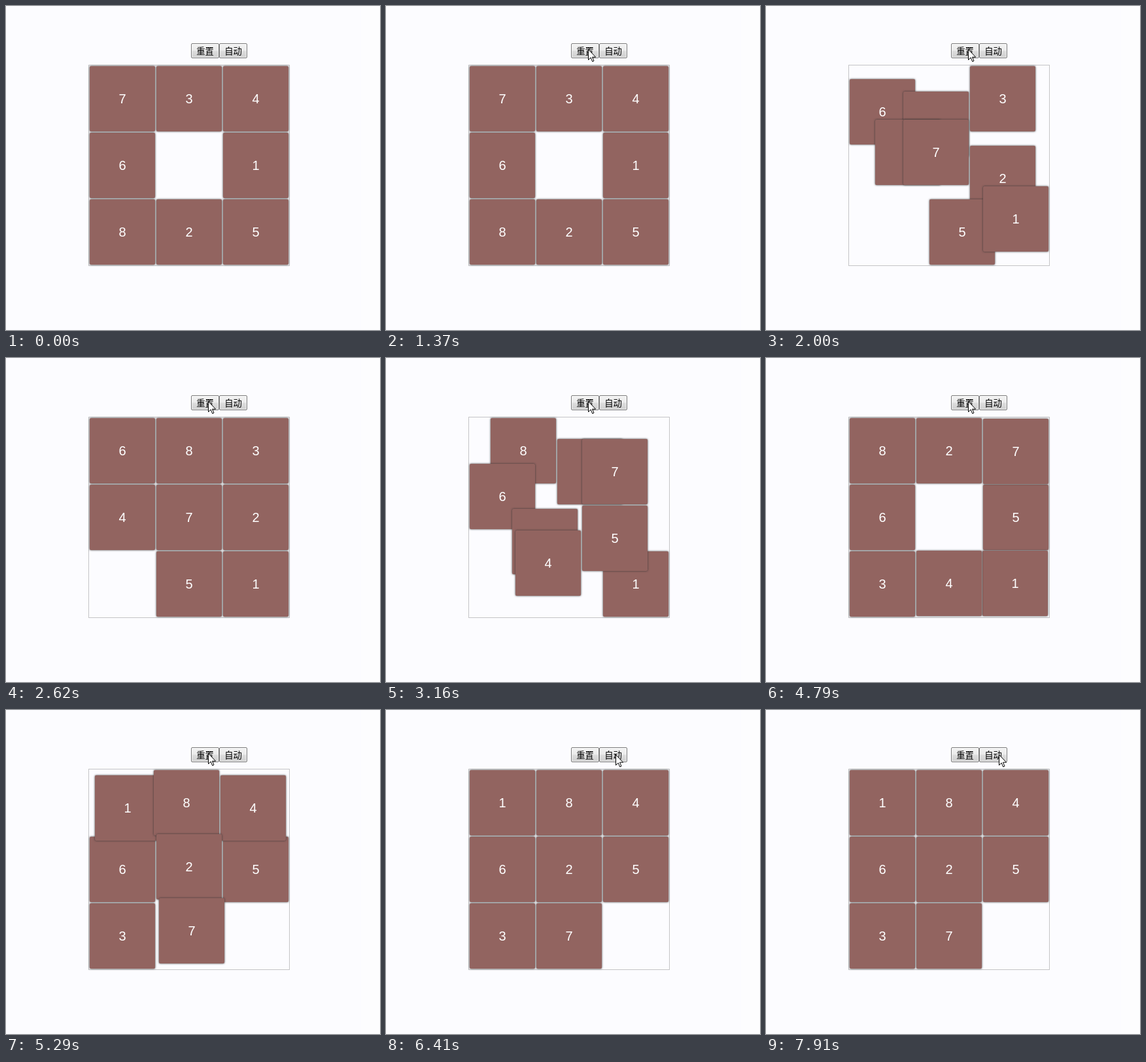
An HTML page for the animation above (8000 ms loop, 572 by 496 pixels).

```html
<!DOCTYPE html>
<html lang="zh">
<head>
<meta charset="utf-8">
<title>Sliding puzzle</title>
<style>
html, body { margin: 0; width: 100%; height: 100%; overflow: hidden; background: #fcfcff; }
#stage { position: relative; width: 572px; height: 496px; overflow: hidden; }
#strip { position: absolute; left: 543px; top: 0; width: 29px; height: 496px; background: #fdfdfe; }
.btn {
  position: absolute; top: 57px; width: 43px; height: 23px; box-sizing: border-box;
  border: 1px solid #7c7c7c; border-radius: 2px;
  background: linear-gradient(#f2f2f2, #ebebeb 48%, #dddddd 52%, #cfcfcf);
  box-shadow: inset 0 0 0 1px rgba(255, 255, 255, .6);
  font: 13.333px/22px "Noto Sans CJK SC", "Noto Sans CJK", sans-serif;
  text-align: center; white-space: nowrap; color: #000;
}
#board {
  position: absolute; left: 126px; top: 90px; width: 306px; height: 306px;
  border: 1px solid #c4c4c6; isolation: isolate;
}
.tile {
  position: absolute; left: 1px; top: 1px; width: 100px; height: 100px; border-radius: 2px;
  background: #926460; box-shadow: 0 0 3px #333; color: #fff;
  font: 20px/101px Arial, "Liberation Sans", sans-serif; text-align: center;
}
#cursor { position: absolute; left: 0; top: 0; overflow: visible; }
</style>
</head>
<body>
<div id="stage">
  <div id="strip"></div>
  <div class="btn" style="left:283px">重置</div>
  <div class="btn" style="left:326px">自动</div>
  <div id="board"></div>
  <svg id="cursor" width="13" height="21">
    <path d="M.5 .5V16.5L4.2 13L6.7 19L9 18L6.5 12.2H11.6Z" fill="#fff" stroke="#000"/>
  </svg>
</div>
<script>
const LOOP = 8000, CELL = 102, SLIDE = 600;

// Boards read row by row; 0 is the gap.
const layouts = ["734601825", "683472051", "827605341", "184625370"];
const starts = [1575, 2790, 4768];

// Pointer stops: time, x, y
const stops = [[790, 489, 101], [1370, 309, 66], [5880, 309, 66], [6560, 356, 68]];

const board = document.getElementById("board");
const cursor = document.getElementById("cursor");
const tiles = [..."12345678"].map(label => {
  const el = document.createElement("div");
  el.className = "tile";
  el.textContent = label;
  board.append(el);
  return { label, el };
});

const clamp = v => Math.min(1, Math.max(0, v));
const swing = p => 0.5 - Math.cos(p * Math.PI) / 2;
const mix = (a, b, p) => Math.round(a + (b - a) * p);
const place = (el, x, y) => { el.style.transform = `translate(${x}px, ${y}px)`; };
const left = cell => cell % 3 * CELL;
const top3 = cell => Math.floor(cell / 3) * CELL;

function drawTiles(t) {
  const move = starts.filter(s => t >= s).length;
  const from = layouts[Math.max(0, move - 1)], to = layouts[move];
  const p = move ? swing(clamp((t - starts[move - 1]) / SLIDE)) : 0;
  for (const { label, el } of tiles) {
    const a = from.indexOf(label), b = to.indexOf(label);
    place(el, mix(left(a), left(b), p), mix(top3(a), top3(b), p));
    // Moving tiles pass over resting ones.
    el.style.zIndex = a === b ? 0 : b + 1;
  }
}

function drawCursor(t) {
  cursor.style.visibility = t < stops[0][0] ? "hidden" : "visible";
  let i = 0;
  while (i < stops.length - 2 && t >= stops[i + 1][0]) i++;
  const [t0, x0, y0] = stops[i], [t1, x1, y1] = stops[i + 1];
  const p = swing(clamp((t - t0) / (t1 - t0)));
  place(cursor, mix(x0, x1, p), mix(y0, y1, p));
}

const begin = performance.now();
function frame() {
  const t = (performance.now() - begin) % LOOP;
  drawTiles(t);
  drawCursor(t);
  requestAnimationFrame(frame);
}
frame();
</script>
</body>
</html>
```
